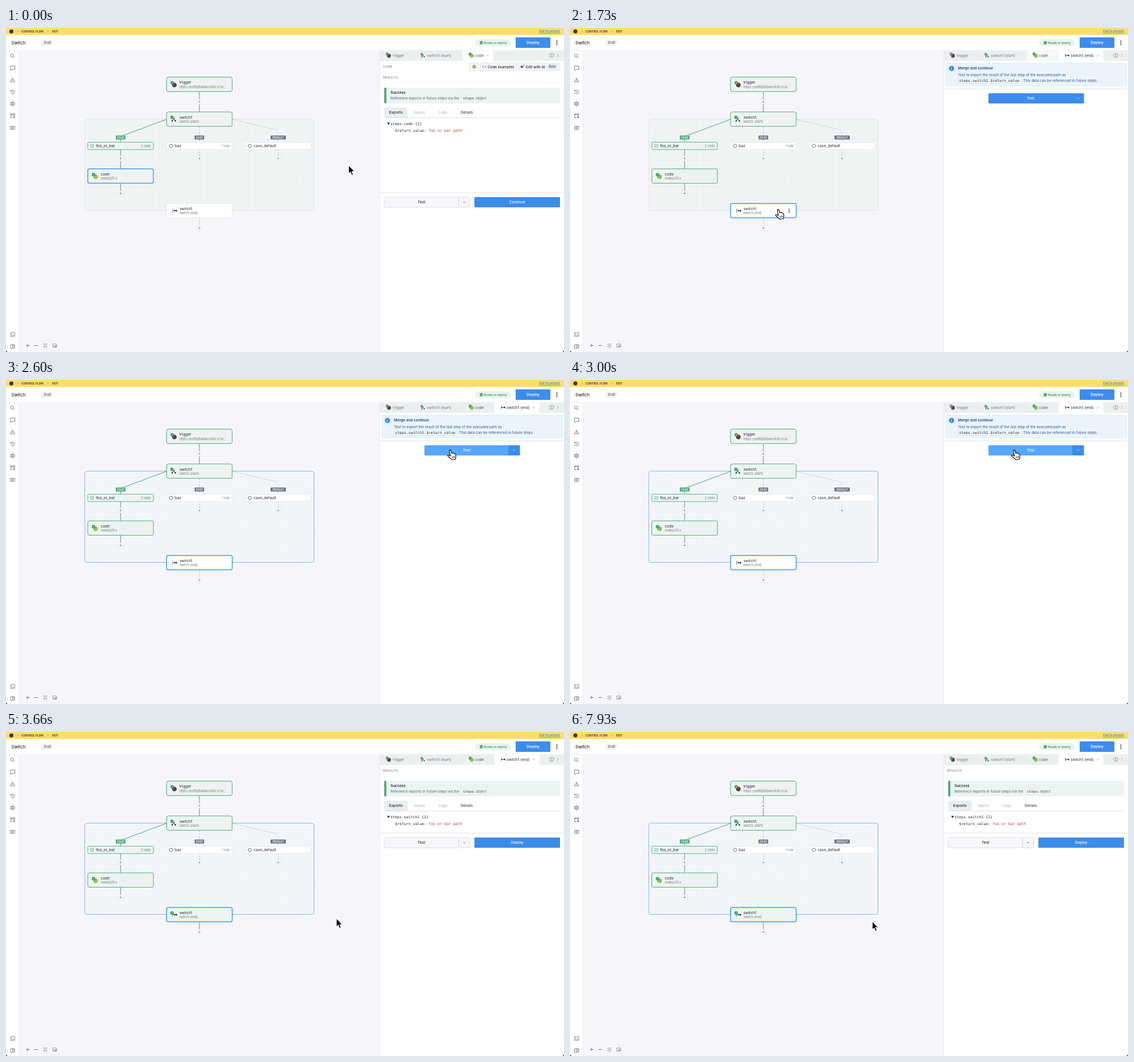
An HTML page that plays this animation: 981x571 px, repeating every 8 s.

```html
<!DOCTYPE html>
<html lang="en">
<head>
<meta charset="utf-8">
<title>Workflow switch</title>
<style>
html, body { margin: 0; width: 100%; height: 100%; overflow: hidden; background: #fff; }
svg { display: block; width: 100%; height: 100%; font-family: Inter, sans-serif; }
.mono { font-family: "DejaVu Sans Mono", monospace; }
text { white-space: pre; }
</style>
</head>
<body>
<svg id="stage" viewBox="0 0 981 571" xmlns="http://www.w3.org/2000/svg"></svg>
<script>
const LOOP = 8000;
const GREEN = '#4fa877', BLUE = '#3b8ceb', INK = '#23282c', MUTED = '#6f777c';

// markup helpers
const text = (x, y, s, size, fill = INK, more = '') =>
  `<text x="${x}" y="${y}" font-size="${size}" fill="${fill}" ${more}>${s}</text>`;
const mid = 'text-anchor="middle"', end = 'text-anchor="end"', med = 'font-weight="500"', bold = 'font-weight="600"';
const mono = (x, y, s, fill = INK) => text(x, y, s, 6.53, fill, 'class="mono"');
const rect = (x, y, w, h, fill, stroke = 'none', rx = 0, more = '') =>
  `<rect x="${x}" y="${y}" width="${w}" height="${h}" fill="${fill}" stroke="${stroke}" rx="${rx}" ${more}/>`;
const path = (d, stroke = INK, w = 0.8, more = '') =>
  `<path d="${d}" fill="none" stroke="${stroke}" stroke-width="${w}" ${more}/>`;
const dot = (x, y, r, fill, stroke = 'none', w = 0.8) =>
  `<circle cx="${x}" cy="${y}" r="${r}" fill="${fill}" stroke="${stroke}" stroke-width="${w}"/>`;
const group = (id, body, more = '') => `<g id="${id}" ${more}>${body}</g>`;
const at = (x, y, body, k = 1) => `<g transform="translate(${x} ${y}) scale(${k})">${body}</g>`;

// icons, centred on 0,0
const check = dot(0, 0, 3, '#32965f') + path('M-1.4 .1L-.4 1.1 1.5-1', '#fff', 0.8);
const hook = dot(1.2, 1.2, 4, '#6e3a4c') + at(-2.5, -2.5, check);
const branch = path('M-2.5-2.5L0 0V0M0 0L3 3M0 0L-2.8 3M0 0L2.6-2.6', INK, 1) +
  dot(3, 3.2, 1.3, INK) + dot(-2.6, 3.2, 1.2, INK) + at(-3, -3, check);
const runtime = dot(1.2, 1.2, 4.2, '#8fc25a') + at(-2.5, -2.5, check);
const merge = [-2.4, 0, 2.4].map(y => dot(-3, y, 0.7, INK)).join('') +
  path('M-1.5 0H3', INK, 1) + dot(0, 0, 1.1, INK) + dot(3.6, 0, 1.5, INK);
const arrowIcon = path('M-3-2.4V2.4M-3 0H2', INK, 0.9) + dot(2.4, 0, 1.3, INK);
const caret = (x, y, c) => path(`M${x - 1.7} ${y - .8}l1.7 1.7 1.7-1.7`, c, 0.8);
const close = (x, y) => path(`M${x - 1.6} ${y - 1.6}l3.2 3.2m0-3.2l-3.2 3.2`, '#8b9296', 0.6);
const dots = (x, y, c, gap = 2.6, r = 0.8) => [-gap, 0, gap].map(d => dot(x, y + d, r, c)).join('');
const plus = (x, y) => rect(x - 4.5, y - 4.5, 9, 9, '#fbfcfd', '#d5d9dc', 2, 'stroke-width=".6"') +
  path(`M${x - 2.6} ${y}h5.2M${x} ${y - 2.6}v5.2`, '#777e83', 0.7);

function chrome() {
  const side = '#555d63';
  let s = rect(0, 0, 981, 12.5, '#fadd6a') + rect(0, 12.5, 981, 27, '#fff') + rect(0, 39, 22.5, 532, '#fff');
  s += dot(9.5, 6, 3.5, '#3a3620');
  s += path('M20 4.5l1.5 1.5L20 7.5M73 4.5l1.5 1.5L73 7.5', '#75683a', 0.6);
  s += text(27, 7.9, 'CONTROL FLOW', 4.85, '#2f2b1d', bold) + text(81, 7.9, 'EDIT', 4.85, '#2f2b1d', bold);
  s += text(974, 8, 'Exit to project', 5.6, '#2c7be0', `${end} ${med} text-decoration="underline"`);
  s += text(9.5, 28.8, 'Switch', 7.7, INK, med);
  s += rect(62.5, 21, 21, 10, '#f0f2f3', 'none', 4) + text(73, 28, 'Draft', 5.7, '#4b5358', mid);
  s += dots(968.5, 26, INK, 2.9, 1);
  s += path('M0 39.3H981M22.5 39V571', '#e6e9eb', 0.6);
  // side bar
  s += dot(10.6, 48.6, 2.5, 'none', side) + path('M12.5 50.5l2.5 2.4', side);
  s += path('M8 67h7.4v6h-5l-2.4 1.6z', side);
  s += path('M11.5 88.2l3.8 6.8H7.7zM11.5 90.7v2M11.5 93.4v.7', side, 0.75);
  s += path('M8.5 111a3.6 3.6 0 1 1-.5 2.4M8.2 109v2.2h2.2M11.6 111v2l1.5 1', side, 0.75);
  s += dot(11.5, 133.5, 3.1, 'none', side, 1) + dot(11.5, 133.5, 1.2, 'none', side, 0.7);
  s += path('M11.5 129.6v1M11.5 136.4v1M8.1 131.5l.9.5M14 135l.9.5M8.1 135.5l.9-.5M14 132l.9-.5', side, 1);
  s += path('M11 158H8v-6.7h7.3v3.2M8 153h7.3', side) + dot(14.2, 157, 1.4, side);
  s += path('M8 173.3h7.3v5.2H8zM9.3 175h4.7M10 177h3.3', side, 0.75);
  s += path('M8 536.7h7.3v6.6H8zM9.5 538.5l1.5 1.5-1.5 1.5M12 541.7h2', side, 0.75);
  s += path('M8 558h7.3v6.4H8zM11.8 558v6.4M13 560h1.4M13 562h1.4', side, 0.75);
  return s;
}

function topState() {
  return group('ready', rect(825, 20, 63, 12, '#e8f4ee', 'none', 6) + at(835.5, 26, check, 0.9) +
      text(840.5, 28, 'Ready to deploy', 5.2, '#2b8654', med) +
      rect(896, 16.5, 61, 18.5, BLUE, 'none', 1.5) + text(926.5, 28.4, 'Deploy', 6.6, '#fff', `${mid} ${bold}`)) +
    group('busy', rect(896, 16.5, 61, 18.5, '#f7f8f8', 'none', 1.5) + text(926.5, 28.4, 'Deploy', 6.6, '#777e83', `${mid} ${med}`));
}

function node(x, y, title, sub, icon, id = '') {
  return `<rect ${id && `id="${id}"`} x="${x}" y="${y}" width="115.4" height="25.4" rx="3" fill="#edf3f1" stroke="${GREEN}" stroke-width="1"/>` +
    at(x + 12.5, y + 12.7, icon) + text(x + 22.6, y + 11.6, title, 6.6) + text(x + 22.6, y + 19.1, sub, 5.55, MUTED);
}
function caseBox(x, label, rules, on) {
  const mark = on
    ? dot(x + 7.8, 207.7, 2.9, 'none', GREEN, 0.8) + path(`M${x + 6.4} 207.8l1 1 1.8-2`, GREEN, 0.7)
    : dot(x + 7.8, 207.7, 2.9, '#fff', '#43494d', 0.8);
  return rect(x, 201.2, 115.4, 13, on ? '#edf4f1' : '#fff', on ? GREEN : '#d9dde0', 2, `stroke-width="${on ? 0.9 : 0.6}"`) +
    mark + text(x + 14.4, 210, label, 6.65) + text(x + 111, 209.8, rules, 5.6, MUTED, end);
}
const badge = (x, w, label, fill) => rect(x - w / 2, 189.4, w, 7.2, fill, 'none', 1) +
  text(x, 194.7, label, 4.6, '#fff', `${mid} ${bold}`);

function canvas() {
  const dash = 'stroke-dasharray="2.4 2"', grey = '#a9afb5', done = '#7d9a8e';
  let s = rect(22.5, 39.5, 634.5, 531.5, '#f6f6fa');
  s += `<rect id="box" x="138.5" y="160.5" width="403" height="161" rx="4"/>` +
    rect(138.5, 160.5, 403, 161, 'url(#grid)', 'none', 4);
  // links
  s += path('M340 112V148M282 161L209 188.3Q202 190.5 201.5 193V201', GREEN, 1.1);
  s += path('M201.5 214V248M201.5 273V288', done, 1.1);
  s += path('M398 161L471 178.5Q478.5 180.5 478.5 189V201M340 174V201M340 214V226M478.5 214V226', grey, 0.8, dash);
  s += group('tailOff', path('M340 335V348', grey, 0.8, dash)) + group('tailOn', path('M340 335V348', GREEN, 1.1));
  s += [[340, 130], [201.5, 230], [340, 230], [478.5, 230], [201.5, 291.5], [340, 352.3]].map(p => plus(...p)).join('');
  s += badge(201.5, 17, 'CASE', GREEN) + badge(340, 17, 'CASE', '#6a7789') + badge(478.5, 27, 'DEFAULT', '#6a7789');
  s += node(282.3, 86.6, 'trigger', 'https://eo8fgflabwvv6zb.m.pi...', hook);
  s += node(282.3, 147.9, 'switch1', 'switch (start)', branch);
  s += caseBox(143.8, 'foo_or_bar', '2 rules', true) + caseBox(282.3, 'baz', '1 rule') + caseBox(420.8, 'case_default', '');
  s += node(143.8, 248.2, 'code', 'nodejs20.x', runtime, 'codeNode');
  s += node(282.3, 309.2, 'switch1', 'switch (end)', at(1, 0, merge), 'endNode');
  s += group('endWait', dot(292, 319, 3.2, '#fff') + `<g class="spin" data-x="292" data-y="319">${path('M0-2.5A2.5 2.5 0 1 1-2.5 0', '#6c7479', 0.7)}</g>`);
  s += group('endDone', at(292, 319, check));
  s += group('endMenu', dots(385.3, 322, INK, 2.7, 0.9));
  // zoom tools
  const c = '#666e74';
  s += path('M35 559.5h6M38 556.5v6M50 559.5h6', c, 0.9);
  s += path('M66.3 558.5v-2h2M69.7 556.5h2v2M71.7 560.5v2h-2M68.3 562.5h-2v-2M67 557.2l4 4.6M71 557.2l-4 4.6', c, 0.6);
  s += path('M82.3 556.8h6.4v5.6h-6.4zM85.5 559.6h3v2.6h-3z', c, 0.7);
  return s;
}

function tabs() {
  const grey = '#eceff0', line = '#dde1e3';
  let s = rect(657, 39.5, 324, 531.5, '#fff') + rect(657, 39.5, 324, 18.5, grey);
  s += `<rect id="codeTab" x="802" y="39.5" width="55.3" height="18.5"/>`;
  s += group('tabEnd', rect(858, 39.5, 80.3, 18.5, '#fff') + at(874, 48.4, arrowIcon) +
    text(880, 50.8, 'switch1 (end)', 6.5) + close(928, 48.5) + path('M938.3 39.5V58', line, 0.6));
  s += group('tabClose', close(847, 48.5));
  s += at(672.3, 48, hook, 0.85) + text(680, 50.8, 'trigger', 6.5, MUTED);
  s += at(733, 48.4, branch, 0.75) + text(740, 50.8, 'switch1 (start)', 6.5, MUTED);
  s += at(818, 48, runtime, 0.85) + text(824.7, 50.8, 'code', 6.5, '#454c51');
  s += path('M657 39.5V571M718 39.5V58M802 39.5V58M857.5 39.5V58', line, 0.6);
  s += path('M956.2 45.3h6.4v6h-6.4zM959.4 45.3v6', '#858d92', 0.7) + dots(970.5, 48.3, '#858d92', 2, 0.6);
  return s;
}

const heading = (y, s) => text(663, y, s, 5.3, '#70787d', `${med} letter-spacing=".35"`);
const rule = y => path(`M657 ${y}H981`, '#dfe2e5', 1) + path(`M657 ${y + 1}H981`, '#f1f3f4', 1);
const button = (x, y, w, label, fill, ink, stroke = 'none') =>
  rect(x, y, w, 18, fill, stroke, 1.5, 'stroke-width=".7"') + text(x + w / 2, y + 11.4, label, 6.5, ink, `${mid} ${med}`);

// result block; y is the centre of the RESULTS heading
function results(y, step, bottom, action) {
  let s = heading(y + 2, 'RESULTS');
  s += rect(665, y + 18, 309, 27.3, '#ecf4f1') + rect(665, y + 18, 3.6, 27.3, '#48a672');
  s += text(676, y + 28.8, 'Success', 6.4, INK, bold);
  s += text(676, y + 38.8, 'Reference exports in future steps via the', 6.3, '#596166');
  s += rect(801.5, y + 32.2, 22.4, 9.2, '#f8fbfa', '#b9c4c0', 1, 'stroke-width=".5" stroke-dasharray="1.4 1"');
  s += mono(803.2, y + 38.8, 'steps') + text(826, y + 38.8, 'object', 6.3, '#596166');
  s += rect(665, y + 53, 41, 18, '#eaedf0') + path(`M665 ${y + 71}H974`, '#cdd2d5', 0.7);
  s += [[685.5, 'Exports', INK], [727, 'Inputs', '#b3b9bd'], [768.5, 'Logs', '#b3b9bd'], [810, 'Details', '#3f464b']]
    .map(([x, n, c]) => text(x, y + 64.2, n, 6.6, c, `${mid} ${med}`)).join('');
  s += `<path d="M670 ${y + 79.5}h5l-2.5 4z" fill="${INK}"/>`;
  s += mono(676, y + 83.6, `steps.${step} {1}`) + mono(684, y + 95.3, '$return_value:') + mono(743, y + 95.3, 'foo or bar path', '#c0343c');
  s += rule(bottom);
  const b = bottom + 8;
  s += button(665, b, 131, 'Test', '#f7f7fb', INK, '#cbcfd6') + rect(796, b, 19.4, 18, '#f7f7fb', '#cbcfd6', 1.5, 'stroke-width=".7"');
  return s + caret(805.7, b + 9, INK) + button(823.4, b, 150.6, action, BLUE, '#fff');
}

function codePanel() {
  const edge = 'stroke-width=".6"';
  let s = heading(70.2, 'CODE') + path('M657 78H981M657 97H981', '#eceeef', 0.6);
  s += rect(815.2, 61.8, 16, 13, '#f6f6fa', '#cfd3d8', 1.5, edge) + dot(823.2, 68.3, 3.3, '#8fc25a');
  s += rect(834, 61.8, 64, 13, '#f6f6fa', '#cfd3d8', 1.5, edge) + path('M839.5 66.5l-1.7 1.8 1.7 1.8M842.3 66.5l1.7 1.8-1.7 1.8', INK, 0.8);
  s += text(847, 70.6, 'Code examples', 6.3, INK, med);
  s += rect(900.7, 61.8, 73.3, 13, '#f6f6fa', '#cfd3d8', 1.5, edge);
  s += `<path d="M907 65.2l.9 2.3 2.3.9-2.3.9-.9 2.3-.9-2.3-2.3-.9 2.3-.9zM910.4 64.3l.4 1 1 .4-1 .4-.4 1-.4-1-1-.4 1-.4z" fill="${INK}"/>`;
  s += text(914, 70.6, 'Edit with AI', 6.3, INK, med) + rect(951.5, 63.6, 18, 9.5, '#e6e9ed', 'none', 2) + text(960.5, 70.3, 'Beta', 5.6, '#4b5358', `${mid} ${med}`);
  return s + results(87.2, 'code', 290, 'Continue');
}

function mergePanel() {
  let s = rect(661, 62, 317, 40, '#ebf4fc', '#cfe3f6', 2, 'stroke-width=".7"');
  s += dot(670.7, 71.3, 4.6, BLUE) + text(670.7, 73.7, 'i', 6.5, '#fff', `${mid} ${bold}`);
  s += text(682, 73.3, 'Merge and continue', 6.4, '#174a80', bold);
  s += text(682, 85.2, 'Test to export the result of the last step of the executed path as', 6.35, '#2b567f');
  s += rect(682, 88.6, 110.5, 9.2, '#f3f8fd', '#a9bccd', 1, 'stroke-width=".5" stroke-dasharray="1.4 1"');
  s += mono(684, 95.3, 'steps.switch1.$return_value') + text(793, 95.2, '. This data can be referenced in future steps.', 6.35, '#2b567f');
  s += rule(107) + `<rect id="testBtn" x="735.6" y="115" width="148" height="18" rx="1.5"/>` + rect(883.6, 115, 20, 18, BLUE, 'none', 1.5);
  return s + text(809.6, 126.4, 'Test', 6.5, '#fff', `${mid} ${med}`) + path('M883.6 115v18', '#2a76d0', 0.7) + caret(893.6, 124, '#fff');
}

function loadPanel() {
  let s = heading(70.2, 'RESULTS') + rect(665, 85.7, 309, 27.3, '#f0f3f4') + rect(665, 85.7, 4, 27.3, '#e3e7e9');
  s += rect(665, 121, 309, 18, '#eff2f3') + rect(665, 121, 42, 18, '#e8ecee') + path('M665 139H974', '#c6cccf', 0.8);
  s += [[665, 66], [676.5, 47.5], [676.5, 38.5], [688, 57], [688, 152.5]]
    .map(([x, w], i) => rect(x, 143.3 + i * 11.9, w, 9.8, '#eff2f3', 'none', 1)).join('');
  s += rule(208) + rect(735.6, 217, 167.8, 18, '#f6f6fb', '#c9ccd6', 1.5, 'stroke-width=".7"') + text(815, 228.4, 'Cancel', 6.6, INK, `${mid} ${med}`);
  return s + `<g class="spin" data-x="831.8" data-y="226">${path('M0-3A3 3 0 1 1-3 0', '#596066', 0.8)}</g>`;
}

const pointer = '<path d="M0 0V14L3.2 11.1 5.4 16.8 7.8 15.9 5.5 10.2H9.9Z" fill="#000" stroke="#fff" stroke-width=".8"/>';
const hand = '<path d="M-2 1.3C-2-.4.2-.6.8 1L2.2 5.6C2.9 4.6 4.4 4.7 4.7 6 5.4 5.2 6.9 5.4 7.2 6.7 8 6.3 9 6.7 9.2 8L9.4 11.5C9.4 13.5 8.8 14 8.7 16L2.2 17C1.5 15.5-2.5 13.2-4.8 10.7-5.8 9.2-4.4 8.2-3 9L-.2 10.4Z" fill="#fff" stroke="#000" stroke-width="1.1" stroke-linejoin="round"/>' +
  path('M2.6 11.2l.7 3M4.8 10.8l.6 3M6.9 10.5l.4 3', '#000', 0.8);

const stage = document.getElementById('stage');
stage.innerHTML = '<defs><pattern id="grid" x="138.5" y="160.5" width="12" height="12" patternUnits="userSpaceOnUse">' +
  path('M12 0V12H0', '#dfe6ea', 0.5, 'opacity=".7"') + '</pattern></defs>' +
  canvas() + chrome() + topState() + tabs() +
  group('panelCode', codePanel()) + group('panelMerge', mergePanel()) +
  group('panelLoad', loadPanel()) + group('panelDone', results(68.2, 'switch1', 178, 'Deploy')) +
  '<path d="M0 571v-3.5Q.3 570.7 3.5 571zM981 571v-3.5Q980.7 570.7 977.5 571z" fill="#111"/>' +
  group('cursor', group('pointer', pointer) + group('hand', hand));

const $ = id => document.getElementById(id);
const show = (id, on) => $(id).setAttribute('display', on ? 'inline' : 'none');
const set = (id, attrs) => { for (const k in attrs) $(id).setAttribute(k, attrs[k]); };
const spins = [...document.querySelectorAll('.spin')];

const SELECT = 1730, FOCUS = 1800, PRESS = 2600, RUN = 3060, DONE = 3590;
const inOut = u => (1 - Math.cos(Math.PI * u)) / 2;
const speedUp = u => u ** 1.4;
// start, end, from, to, easing
const moves = [
  [30, 460, [602.5, 242.5], [366.5, 320], inOut],
  [1790, 2460, [366.5, 320], [781.5, 123.5], inOut],
  [3021, 3660, [781.5, 123.5], [581, 329], inOut],
  [7730, 7930, [578, 329], [531.5, 334], speedUp]
];

function cursorAt(t) {
  const m = moves.filter(v => t >= v[0]).pop() || moves[0];
  const k = m[4](Math.min(1, Math.max(0, (t - m[0]) / (m[1] - m[0]))));
  return [0, 1].map(i => m[2][i] + (m[3][i] - m[2][i]) * k);
}
const inside = ([x, y], l, t, r, b) => x >= l && x <= r && y >= t && y <= b;

function draw(t) {
  const picked = t >= SELECT, focus = t >= FOCUS, loading = t >= RUN && t < DONE, done = t >= DONE;
  const pos = cursorAt(t);
  const onNode = inside(pos, 282, 309, 398, 335);
  const onTest = picked && t < RUN && inside(pos, 736, 115, 904, 133);

  show('panelCode', !picked);
  show('panelMerge', picked && t < RUN);
  show('panelLoad', loading);
  show('panelDone', done);
  show('ready', !loading);
  show('busy', loading);
  show('tabEnd', picked);
  show('tabClose', !picked);
  set('codeTab', { fill: !picked ? '#fff' : focus ? '#eceff0' : '#f7f9f9' });
  set('testBtn', { fill: t >= PRESS ? '#57a8fc' : BLUE });

  set('box', {
    fill: focus ? '#f3f6f9' : '#f1f4f4', stroke: focus ? '#7db6f1' : '#bfc6cc',
    'stroke-width': focus ? 1 : 0.7, 'stroke-dasharray': focus ? 'none' : '1.2 1.2'
  });
  set('codeNode', { stroke: picked ? GREEN : '#459bf0', 'stroke-width': picked ? 1 : 1.5 });
  set('endNode', {
    fill: done ? '#edf3f1' : '#fff', stroke: picked ? '#459bf0' : '#dde1e4', 'stroke-width': picked ? 1.5 : 0.7
  });
  show('endWait', loading);
  show('endDone', done);
  show('endMenu', onNode);
  show('tailOff', !done);
  show('tailOn', done);

  for (const g of spins)
    g.setAttribute('transform', `translate(${g.dataset.x} ${g.dataset.y}) rotate(${(t - 3460) * 0.36})`);
  set('cursor', { transform: `translate(${pos[0].toFixed(2)} ${pos[1].toFixed(2)})` });
  show('hand', onNode || onTest);
  show('pointer', !(onNode || onTest));
}

const began = performance.now();
function tick() {
  draw((performance.now() - began) % LOOP);
  requestAnimationFrame(tick);
}
tick();
</script>
</body>
</html>
```
